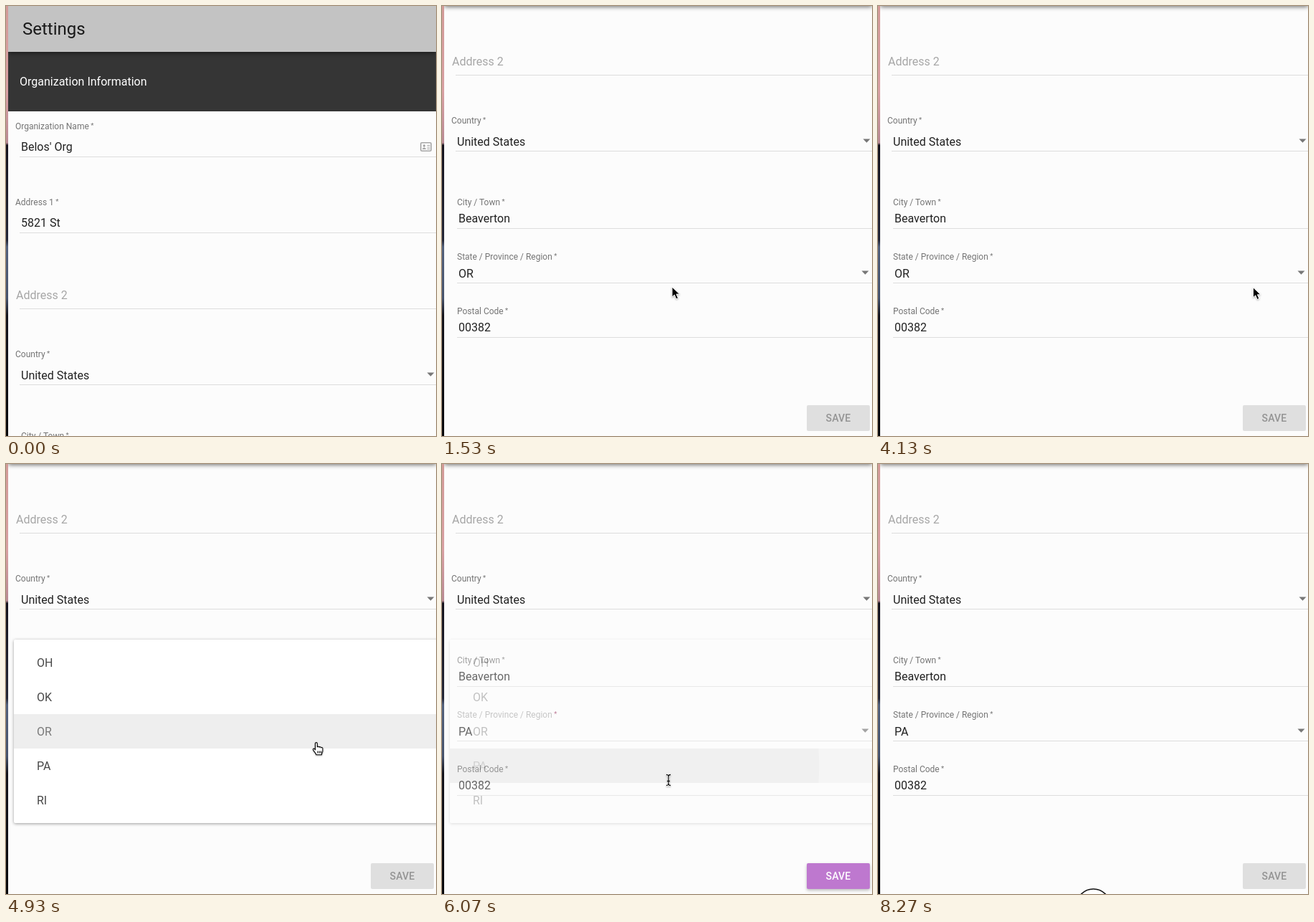
Animation, 600 px wide and 600 px high, one loop 8.34 s. Source, as an HTML page:

```html
<!DOCTYPE html>
<html lang="en">
<head>
<meta charset="utf-8">
<title>Settings form</title>
<style>
  html, body { margin: 0; width: 100%; height: 100%; overflow: hidden; background: #fcfcfc; }
  svg { display: block; width: 600px; height: 600px; font: 16px Roboto, sans-serif; }
  .value { fill: rgba(0,0,0,.87); }
  .hint { fill: rgba(0,0,0,.34); }
  .label { font-size: 12px; fill: rgba(0,0,0,.54); }
  .star { font-size: 9.75px; }
  .line { fill: rgba(0,0,0,.12); }
  .arrow { fill: #777; }
  .bar { filter: drop-shadow(0 1px 3px rgba(0,0,0,.6)); }
  .menu { filter: drop-shadow(0 1px 2px rgba(0,0,0,.38)); }
  .item { fill: rgba(0,0,0,.72); }
  .button { font-size: 14px; font-weight: 500; letter-spacing: .01em; }
  .raised { filter: drop-shadow(0 2px 2px rgba(0,0,0,.26)); }
  .pointer { filter: drop-shadow(0 1px 1px rgba(0,0,0,.3)); }
</style>
</head>
<body>
<svg viewBox="0 0 600 600">
  <defs>
    <linearGradient id="photo" x1="0" y1="0" x2="0" y2="1">
      <stop offset="0" stop-color="#d39b98"/>
      <stop offset=".2" stop-color="#d8a0a2"/>
      <stop offset=".318" stop-color="#b98a93"/>
      <stop offset=".324" stop-color="#15131d"/>
      <stop offset=".545" stop-color="#242737"/>
      <stop offset=".56" stop-color="#53617c"/>
      <stop offset=".68" stop-color="#46536c"/>
      <stop offset=".72" stop-color="#14141c"/>
      <stop offset="1" stop-color="#08080b"/>
    </linearGradient>
    <clipPath id="pane"><rect x="3" width="597" height="600"/></clipPath>
    <clipPath id="row"><rect x="11" y="397" width="589" height="48"/></clipPath>
  </defs>
  <rect width="4" height="600" fill="url(#photo)"/>
  <g clip-path="url(#pane)">
    <rect x="3" width="597" height="600" fill="#fcfcfc"/>
    <g id="page">
      <rect x="3" y="64" width="597" height="83" fill="#353535"/>
      <text x="19" y="111" fill="#fff">Organization Information</text>
      <g id="fields"></g>
      <g fill="none" stroke="#a6a6a6" stroke-width="1.6">
        <rect x="578.8" y="190.8" width="14.4" height="11.4" rx="1.5"/>
        <path d="M587.5 194.5h4M587.5 197h4M587.5 199.5h4" stroke-width="1.2"/>
        <path d="M581 200c0-3.4 5-3.4 5 0z" fill="#a6a6a6" stroke="none"/>
        <circle cx="583.5" cy="195" r="1.7" fill="#a6a6a6" stroke="none"/>
      </g>
      <g id="save" class="button">
        <rect id="face" x="509" y="883" width="88" height="36" rx="2"/>
        <text id="caption" x="553" y="906" text-anchor="middle">SAVE</text>
      </g>
    </g>
    <g id="busy">
      <text class="value" x="312" y="538" text-anchor="middle">Updating Organization data</text>
      <circle id="spinner" cx="281" cy="635" r="38" fill="none" stroke="#c3c3c3" stroke-width="5" stroke-dasharray="45 194"/>
    </g>
    <g id="menu" class="menu">
      <rect x="11" y="245" width="620" height="256" rx="2" fill="#fff"/>
      <rect id="chosen" x="11" y="349" width="589" height="48" fill="#eee"/>
      <rect id="hover" x="11" y="397" width="589" height="48" fill="#e8e8e8"/>
      <circle id="ripple" cx="250" cy="421" fill="#d8d8d8" clip-path="url(#row)"/>
      <g id="items"></g>
    </g>
    <g id="bar" class="bar">
      <rect x="3" width="597" height="64" fill="#c3c3c3"/>
      <text class="value" x="23" y="40" font-size="24">Settings</text>
    </g>
    <circle id="ring" cx="300.5" cy="616.5" r="23.5" fill="#fff" stroke="#111" stroke-width="1.6"/>
  </g>
  <g id="cursor" class="pointer">
    <path id="arrow" d="M0 0v14.2l3.3-3.1 2.5 5.7 2.7-1.2-2.5-5.5h4.6z" fill="#000" stroke="#fff" stroke-width="1"/>
    <path id="hand" d="M-1.5 1c0-1.8 2.8-1.8 2.8 0v5c.3-1.3 2.6-1 2.7.3.4-1 2.5-.8 2.6.6.5-.8 2.3-.5 2.3 1v3.600c0 2-1.500 2.500-1.500 5.200h-7.600c-.5-2.700-2.800-4-4.200-6.800-.7-1.500 1-2.300 2-1.200l.9 1.200zM2 11.500v3M4.300 11.500v3M6.500 11.500v3" fill="#fff" stroke="#000" stroke-width="1.1" stroke-linejoin="round"/>
    <g id="beam" fill="none">
      <path d="M-3-7.500q3 0 3 2.500 0-2.500 3-2.500M0-5v10M-3 7.500q3 0 3-2.500 0 2.500 3 2.500M-2 1.500h4" stroke="#fff" stroke-width="3"/>
      <path d="M-3-7.500q3 0 3 2.500 0-2.500 3-2.500M0-5v10M-3 7.500q3 0 3-2.500 0 2.500 3 2.500M-2 1.500h4" stroke="#111" stroke-width="1.300"/>
    </g>
  </g>
</svg>
<script>
const $ = id => document.getElementById(id);
const LOOP = 8340, STEP = 200 / 3, LAST = 124;

// label, label x, label y, value, value x, value y, line x, line y
const fields = [
  ["Organization Name", 13, 171.5, "Belos' Org", 21, 202, 19, 210],
  ["Address 1", 13, 277.5, "5821 St", 21, 308, 19, 316],
  ["", 0, 0, "Address 2", 14, 409, 19, 422],
  ["Country", 13, 489.5, "United States", 21, 521, 19, 528],
  ["City / Town", 21, 603.5, "Beaverton", 23, 628, 21, 636],
  ["State / Province / Region", 21, 679.5, "OR", 23, 705, 21, 712],
  ["Postal Code", 21, 755.5, "00382", 23, 780, 21, 788]
];
const label = (s, x, y) => s &&
  `<text class="label" x="${x}" y="${y}">${s}<tspan class="star" dx="2.4" dy="-1.5">*</tspan></text>`;
const triangle = (x, y) => `<path class="arrow" d="M${x} ${y}h10l-5 5.200z"/>`;

$("fields").innerHTML = fields.map(([s, lx, ly, v, x, y, ux, uy]) =>
  `<g>${label(s, lx, ly)}<text class="${s ? "value" : "hint"}" x="${x}" y="${y}">${v}</text>
   <rect class="line" x="${ux}" y="${uy}" width="${600 - ux}" height="1"/></g>`
).join("") + triangle(587.5, 511.5) + triangle(585.5, 695.5);

$("items").innerHTML = ["OH", "OK", "OR", "PA", "RI"].map((s, i) =>
  `<text class="item" x="43" y="${283 + 48 * i}">${s}</text>`).join("");

const state = $("fields").children[5];
const stateLabel = state.querySelector(".label");
const stateStar = state.querySelector(".star");
const stateValue = state.querySelector(".value");
const items = $("items").children;

const clamp = v => Math.max(0, Math.min(1, v));
const ramp = (t, a, b) => clamp((t - a) / (b - a));
const smooth = p => p * p * (3 - 2 * p);
const show = (el, on) => { el.style.display = on ? "" : "none"; };

// time, x, y of the pointer's hot spot
const route = [
  [0, 301, 640], [67, 303, 556], [267, 321, 392], [2333, 321, 392],
  [2533, 302, 562], [2667, 302, 562], [2800, 285, 495], [3533, 440, 416],
  [4000, 554, 395], [4400, 436, 386], [4933, 433, 389], [5333, 431, 399],
  [5900, 330, 427], [6067, 316, 441], [6600, 532, 570], [6933, 524, 574],
  [7067, 518, 579], [7533, 330, 640], [LOOP, 330, 640]
];

function pointerAt(t) {
  const i = Math.max(1, route.findIndex(p => p[0] >= t));
  const [t0, x0, y0] = route[i - 1], [t1, x1, y1] = route[i];
  const p = smooth(ramp(t, t0, t1));
  return [x0 + (x1 - x0) * p, y0 + (y1 - y0) * p];
}

function pointerKind(t, x, y, open, enabled) {
  if (t < 2700) return "arrow";
  if (open || (y > 345 && y < 390)) return "hand";
  if (y > 405 && y < 463) return "beam";
  return enabled && x > 509 && x < 597 && y > 557 ? "hand" : "arrow";
}

function scrollAt(t) {
  if (t >= 1530) return 326;
  if (t >= 1265) return 288;
  return Math.round(120 * smooth(ramp(t, 400, 1000)));
}

function draw(t) {
  const scroll = scrollAt(t);
  $("page").setAttribute("transform", `translate(0 ${-scroll})`);
  $("bar").setAttribute("transform", `translate(0 ${-Math.min(64, scroll)})`);

  const picked = t >= 5930;
  const closing = picked && t < 6190;
  const fade = picked ? 1 - ramp(t, 5933, 6130) : ramp(t, 4400, 4600);
  $("menu").style.opacity = fade;
  show($("menu"), fade > 0);
  show($("chosen"), !picked);
  show($("hover"), t >= 5330);
  $("ripple").setAttribute("r", Math.max(0, (t - 5865) * 1.37));
  items[2].style.opacity = picked ? 1 : .68;
  items[3].style.opacity = picked ? .6 : 1;

  stateValue.textContent = picked ? "PA" : "OR";
  stateLabel.style.fill = closing ? "rgba(0,0,0,.32)" : "";
  stateStar.style.fill = closing ? "#9c3a63" : "";

  const busy = t >= 6730 && t < 7330;
  const enabled = picked && t < 6730;
  show($("busy"), busy);
  show($("save"), !busy);
  $("save").setAttribute("class", enabled ? "button raised" : "button");
  $("face").style.fill = enabled ? "#be78cf" : "#dfdfdf";
  $("caption").style.fill = enabled ? "#fff" : "#939393";
  $("spinner").setAttribute("transform", `rotate(${-83 + (t - 6933) * .25} 281 635)`);
  $("ring").style.opacity = ramp(t, 8000, 8266);

  const [x, y] = pointerAt(t);
  const kind = pointerKind(t, x, y, fade > 0 && !picked, enabled);
  $("cursor").setAttribute("transform", `translate(${x.toFixed(1)} ${y.toFixed(1)})`);
  for (const k of ["arrow", "hand", "beam"]) show($(k), k === kind);
}

const start = performance.now();
function tick() {
  const t = (performance.now() - start) % LOOP;
  draw(Math.min(LAST, Math.floor((t + 5) / STEP)) * STEP);
  requestAnimationFrame(tick);
}
tick();
</script>
</body>
</html>
```
